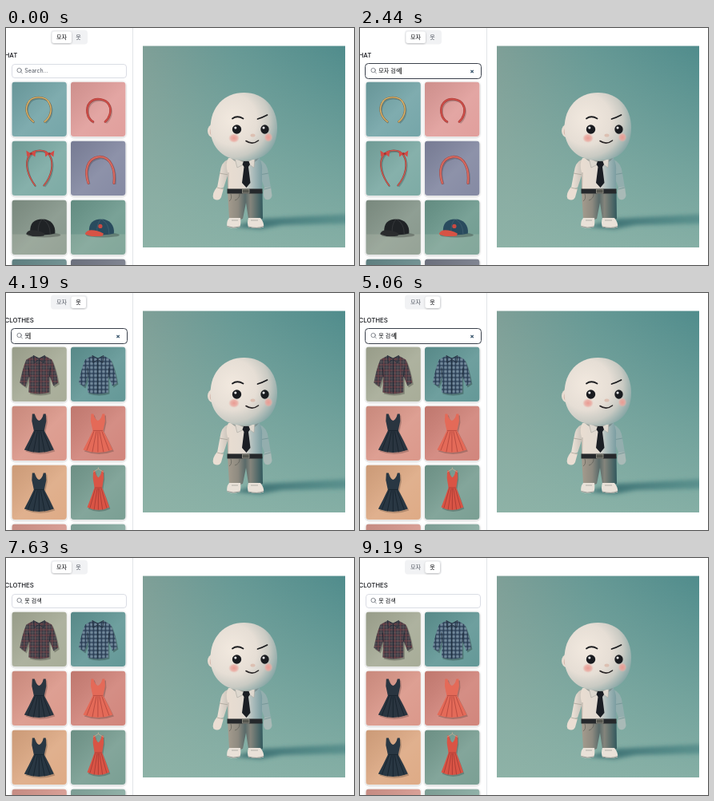
Recreate the animation shown at these times as an HTML page. Size 435 by 297 pixels, loop 9.25 s.

```html
<!DOCTYPE html>
<html>
<head>
<meta charset="utf-8">
<title>Outfit picker</title>
<style>
  html, body { margin: 0; width: 100%; height: 100%; overflow: hidden; background: #fff; }
  svg { display: block; width: 435px; height: 297px; }
  text { font-family: Inter, "Noto Sans CJK KR", "Noto Sans CJK", sans-serif; font-size: 7px; white-space: pre; }
  .tab { font-weight: 500; text-anchor: middle; }
  #heading { font-size: 7.8px; font-weight: 500; fill: #15171c; }
</style>
</head>
<body>
<svg viewBox="0 0 435 297">
  <defs>
    <linearGradient id="wall" x1="0" y1=".1" x2="1" y2="0">
      <stop offset="0" stop-color="#7f9f97"/><stop offset=".45" stop-color="#679995"/><stop offset="1" stop-color="#508c8c"/>
    </linearGradient>
    <linearGradient id="floor" x1="0" y1="0" x2="0" y2="1">
      <stop offset="0" stop-color="#91b7ab" stop-opacity="0"/><stop offset=".6" stop-color="#91b7ab" stop-opacity=".5"/><stop offset="1" stop-color="#91b7ab" stop-opacity=".8"/>
    </linearGradient>
    <linearGradient id="cast" x1="0" x2="1" y1="0" y2="0">
      <stop offset="0" stop-color="#2f6468" stop-opacity=".9"/><stop offset="1" stop-color="#3f7d7e" stop-opacity=".55"/>
    </linearGradient>
    <radialGradient id="skin" cx=".33" cy=".4" r=".74">
      <stop offset="0" stop-color="#f2e9df"/><stop offset=".5" stop-color="#e6ded5"/><stop offset=".74" stop-color="#c9cac3"/><stop offset="1" stop-color="#7fa2a2"/>
    </radialGradient>
    <radialGradient id="blush">
      <stop offset="0" stop-color="#e99a92"/><stop offset=".6" stop-color="#eaa79e" stop-opacity=".8"/><stop offset="1" stop-color="#eab5ab" stop-opacity="0"/>
    </radialGradient>
    <linearGradient id="cloth" x1="0" x2="1" y1="0" y2="0">
      <stop offset="0" stop-color="#e9ddd1"/><stop offset=".5" stop-color="#e2dad1"/><stop offset=".75" stop-color="#a9bbbb"/><stop offset="1" stop-color="#7a9da1"/>
    </linearGradient>
    <linearGradient id="sleeve" x1="0" x2="1" y1="0" y2="0">
      <stop offset="0" stop-color="#efe4d9"/><stop offset="1" stop-color="#c9c3ba"/>
    </linearGradient>
    <linearGradient id="pants" x1="0" x2="1" y1="0" y2="0">
      <stop offset="0" stop-color="#a59c8e"/><stop offset=".3" stop-color="#8e8a80"/><stop offset=".5" stop-color="#596a69"/><stop offset=".65" stop-color="#85857c"/><stop offset="1" stop-color="#31585d"/>
    </linearGradient>
    <linearGradient id="light" x1="0" y1="0" x2="1" y2="1">
      <stop offset="0" stop-color="#000" stop-opacity=".08"/><stop offset=".55" stop-color="#fff" stop-opacity=".1"/><stop offset="1" stop-color="#fff" stop-opacity=".03"/>
    </linearGradient>
    <pattern id="redPlaid" width="7" height="7" patternUnits="userSpaceOnUse">
      <path d="M0 0H7V7H0Z" fill="#34343f"/><path d="M0 1.5H7M1.5 0V7" stroke="#6d4449" stroke-width="1.3"/><path d="M0 5H7M5 0V7" stroke="#8f8583" stroke-width=".4"/>
    </pattern>
    <pattern id="bluePlaid" width="5" height="5" patternUnits="userSpaceOnUse">
      <path d="M0 0H5V5H0Z" fill="#466078"/><path d="M0 1H5M1 0V5" stroke="#93a8b4" stroke-width=".7"/><path d="M0 3.5H5M3.5 0V5" stroke="#2b3d52" stroke-width="1"/>
    </pattern>
    <filter id="soft" x="-30%" y="-60%" width="160%" height="220%"><feGaussianBlur stdDeviation="2.5"/></filter>
    <filter id="lift" x="-10%" y="-10%" width="120%" height="125%"><feDropShadow dx="0" dy=".7" stdDeviation=".8" flood-opacity=".28"/></filter>
    <clipPath id="photo"><path d="M171 22.5H424V275H171Z"/></clipPath>
    <clipPath id="card"><rect width="68.5" height="68.5" rx="4"/></clipPath>
  </defs>

  <path d="M0 0H435V297H0Z" fill="#fff"/>
  <path d="M158.5 0V297" stroke="#e1e4e8"/>

  <rect x="56" y="2.5" width="46" height="18" rx="4" fill="#f1f2f4"/>
  <rect id="pillHat" x="57.5" y="4.5" width="24.5" height="14.5" rx="3" fill="#fff" filter="url(#lift)"/>
  <rect id="pillClothes" x="81.5" y="4.5" width="18.5" height="14.5" rx="3" fill="#fff" filter="url(#lift)"/>
  <text id="labelHat" class="tab" x="69.5" y="14.3">모자</text>
  <text id="labelClothes" class="tab" x="90.5" y="14.3">옷</text>
  <text id="heading" x="-1.5" y="37.4"></text>

  <rect id="field" fill="#fff"/>
  <g fill="none" stroke="#555b65" stroke-width=".7" stroke-linecap="round">
    <circle cx="16.6" cy="53" r="2.7"/><path d="M18.6 55 20.4 56.8"/>
  </g>
  <text id="query" x="23.3" y="56.2"></text>
  <path id="caret" d="M0 49.5V58" stroke="#111" stroke-width="1"/>
  <path id="clear" d="M138.4 52.8 141.8 56.2M141.8 52.8 138.4 56.2" stroke="#27465f" stroke-width="1.1"/>
  <g id="hatCards"></g>
  <g id="clothesCards"></g>

  <g clip-path="url(#photo)">
    <path d="M171 22H424V275H171Z" fill="url(#wall)"/>
    <path d="M171 22H424V275H171Z" fill="url(#floor)"/>
    <path d="M285 249 322 239 430 233V245L345 247 318 252Z" fill="url(#cast)" filter="url(#soft)"/>

    <g id="legs">
      <path d="M277 205H320.5L321 239Q312 242 303 239L300 219 296 239Q288 242 279 239Z" fill="url(#pants)"/>
      <path d="M281 208Q283 214 279 217M292 208Q292 214 286 216" stroke="#5e5d57" stroke-width=".7" fill="none"/>
      <path d="M279 238H293Q294 246 292 249.500Q284 252 276.500 249Q275 243 279 238ZM303 238H318Q323 244 322 249.500Q314 252 303 249.500Q301 244 303 238Z" fill="#e9e1d8"/>
      <path d="M276.500 248.500Q284 251.500 292 249M303 249Q314 252 322 248.500" stroke="#8d938e" fill="none"/>
      <path d="M282 241H290M306 241H315" stroke="#aaa8a0" stroke-width=".9"/>
    </g>
    <g id="arms">
      <path d="M277 165Q269 168 267.500 181L264 200H272L278 182Z" fill="url(#sleeve)"/>
      <path d="M317 165Q326 168 328 182L331 200H323L316 181Z" fill="#93aeae"/>
      <path d="M264 199Q256.500 208 259.500 214Q266 218 269 212L272 201Z" fill="#eaded3"/>
      <path d="M323 200Q320 210 324 214.500Q331 217 332.500 210L331 199Z" fill="#a9bab7"/>
      <path d="M267 182 278 184M264 200 272 202" stroke="#a9a299" stroke-width=".8"/>
      <path d="M328 182 317 184M331 200 323 202" stroke="#6f9294" stroke-width=".8"/>
    </g>
    <path d="M278 163H317Q321 171 320 181V204H277V181Q274 170 278 163Z" fill="url(#cloth)"/>
    <path d="M278 181 277.500 203" stroke="#a39d95" stroke-width=".8"/>
    <path d="M281 163H316Q312 170 300 171Q288 170 281 163Z" fill="#6d7f7e" opacity=".6"/>
    <path d="M286 163 299 169 311 163 310 175 301 169 289 175Z" fill="#ded8cf" stroke="#a8a7a0" stroke-width=".6"/>
    <path d="M297 167H303.500L305 171 303 174 305.500 194 300.500 200 295 194 297.500 174 295.500 171Z" fill="#1b1e24"/>
    <path d="M276.500 201.500H320.500V207.500H276.500Z" fill="#25282b"/>
    <path d="M295.500 202H304V207H295.500Z" fill="#55564f" stroke="#98968c" stroke-width=".8"/>

    <ellipse cx="258.500" cy="129" rx="6.500" ry="8.200" fill="#e8dcd1"/>
    <ellipse cx="258" cy="130" rx="3.200" ry="4.800" fill="#d2b3a6"/>
    <path d="M297.500 81C322 81 339 99 339 125C339 151 324 166 298 166C273 166 255.500 151 255.500 125.500C255.500 99 273 81 297.500 81Z" fill="url(#skin)"/>
    <ellipse cx="285" cy="138" rx="7" ry="6" fill="url(#blush)"/>
    <ellipse cx="328" cy="137" rx="5.500" ry="6" fill="url(#blush)"/>
    <g fill="#191b1f">
      <circle cx="288.500" cy="127" r="5.700"/><ellipse cx="323.500" cy="127" rx="5.200" ry="5.700"/>
    </g>
    <path d="M283 113.500Q289 109 296.500 113.500M314.500 114Q320 112.500 326.500 109" fill="none" stroke="#1c1d20" stroke-width="1.800" stroke-linecap="round"/>
    <g fill="#fff"><circle cx="286.800" cy="125" r="1.500"/><circle cx="322" cy="125" r="1.500"/></g>
    <ellipse cx="308.500" cy="134.500" rx="3" ry="2" fill="#dcc0b2"/>
    <path d="M300 141.500Q308 147 315.500 141" fill="none" stroke="#292526" stroke-width="1.600" stroke-linecap="round"/>
  </g>
</svg>

<script>
const LOOP = 9250;
const FADE = 150;
const $ = id => document.getElementById(id);
const setAttrs = (el, attrs) => Object.entries(attrs).forEach(([k, v]) => el.setAttribute(k, v));

// Thumbnails, each drawn in a 68.5 px square.
const band = (d, color, edge, width) =>
  `<path d="${d}" transform="translate(1.2 1.5)" fill="none" stroke="#000" stroke-opacity=".18" stroke-width="${width}"/>
   <path d="${d}" fill="none" stroke="${edge}" stroke-width="${width}" stroke-linecap="round"/>
   <path d="${d}" fill="none" stroke="${color}" stroke-width="${width * .6}" stroke-linecap="round"/>`;

const bow = (x, y) =>
  `<path d="M${x} ${y}l-6-4 1 8zl6-4-1 8z" fill="#d34b45"/><circle cx="${x}" cy="${y}" r="1.5" fill="#a9302f"/>`;

const cap = (dome, brim, badge = '') =>
  `<path d="M0 43H69V69H0Z" fill="#dce0cf" opacity=".16"/>
   <ellipse cx="40" cy="44" rx="21" ry="3" fill="#000" opacity=".25"/>
   <path d="M23 41C22 29 28 24 38 24C49 24 55 32 54 42Q40 46 23 41Z" fill="${dome}"/>
   <path d="M38 24Q32 30 33 42M38 24Q48 29 48 43" fill="none" stroke="#fff" stroke-opacity=".13" stroke-width=".7"/>
   <path d="M23 38Q31 37 41 42L40 45Q27 47 18 43Q18 40 23 38Z" fill="${brim}"/>${badge}`;

const SHIRT = 'M27 11 18 16Q13 28 10 45L17 50 22 36 21 57Q34 61 47 57L47 36 52 49 58 45Q55 27 50 16L41 11 34 14Z';
const shirt = fill =>
  `<path d="${SHIRT}" transform="translate(1.5 2)" opacity=".25"/>
   <path d="${SHIRT}" fill="${fill}"/>
   <path d="M34 16V58M22 38 21 26M47 38 48 26" stroke="#15202c" stroke-width=".9" opacity=".8"/>
   <path d="M27 11 34 15 41 11 40 20 34 16 28 20Z" fill="${fill}" stroke="#202b38" stroke-width=".8"/>`;

const DRESS = 'M25.500 10H28.500Q30 17 34 18.500Q38 17 39.500 10H42.500L43 19 40.500 31Q47 43 52.500 55Q34 62 15.500 55Q22 43 27.500 31L25 19Z';
const dress = (color, fold) =>
  `<path d="${DRESS}" transform="translate(1.5 2)" opacity=".2"/>
   <path d="${DRESS}" fill="${color}"/>
   <path d="M28 31H40M29 32 20 56M32 32 27 58M34 32V58M36 32 41 58M39 32 48 56" fill="none" stroke="${fold}" stroke-width=".9"/>`;
const hungDress = (color, fold) =>
  `<g transform="translate(9 -3) scale(.75 1.02)">${dress(color, fold)}</g>
   <path d="M28 9 34.500 5 41 9M34.500 5V3" fill="none" stroke="#cdb498" stroke-width=".7"/>`;
const badge = '<circle cx="37" cy="33" r="2.6" fill="#c94a43"/>';

const hats = [
  ['#71a3a6', band('M27 50C19 44 16 35 20 27C24 17 43 17 47 27C51 35 48 45 41 50', '#d9b36c', '#80633b', 2.4)],
  ['#e09c99', band('M28 50C20 46 18 33 24 26C30 19 44 21 48 29C52 37 48 46 43 50', '#d34f49', '#9f3633', 2.6)],
  ['#79a8a2', band('M29 56C20 44 15 28 22 18C28 10 42 10 47 18C53 28 50 44 40 56', '#d7574d', '#6f4945', 2) + bow(24, 16) + bow(47, 16)],
  ['#8186a0', band('M22 53C17 38 20 22 35 20C50 19 56 36 54 53', '#d86b60', '#a54947', 3)],
  ['#839488', cap('#202326', '#2a2c2e')],
  ['#6b988c', cap('#294b5e', '#d75345', badge)],
  ['#66898a', ''],
  ['#747987', '']
];
const clothes = [
  ['#a5aa95', shirt('url(#redPlaid)')],
  ['#5f9594', shirt('url(#bluePlaid)')],
  ['#da9587', dress('#2a3540', '#18222c')],
  ['#d08278', dress('#e46a58', '#b5493f')],
  ['#dda882', dress('#293743', '#17232d')],
  ['#769c90', hungDress('#d95445', '#a53a33')],
  ['#d6978d', ''],
  ['#86aaa0', '']
];

const renderCards = cards => cards.map(([color, art], i) =>
  `<g transform="translate(${7.3 + i % 2 * 73.6} ${67.4 + Math.floor(i / 2) * 74})">
    <rect x="-.5" y="-.5" width="69.500" height="69.500" rx="4.500" fill="#f4f5f5" filter="url(#lift)"/>
    <g clip-path="url(#card)"><path d="M0 0H69V69H0Z" fill="${color}"/><path d="M0 0H69V69H0Z" fill="url(#light)"/>${art}</g>
  </g>`).join('');
$('hatCards').innerHTML = renderCards(hats);
$('clothesCards').innerHTML = renderCards(clothes);

// Steps: [start, tab, query, focused, clear button]
const typing = (start, gap, tab, words) =>
  words.map((word, i) => [start + i * gap, tab, word, true, true]);
const hatWords = ['ㅁ', '모', '몾', '모자', '모자 ', '모자 ㄱ', '모자 거', '모자 검', '모자 검ㅅ', '모자 검새', '모자 검색'];
const clothesWords = ['ㅇ', '오', '옷', '옷 ', '옷 ㄱ', '옷 거', '옷 검', '옷 검ㅅ', '옷 검새', '옷 검색'];
const steps = [
  [0, 'hat', '', false, false],
  [620, 'hat', '', true, false],
  ...typing(1000, 125, 'hat', hatWords),
  [3060, 'clothes', '', false, false],
  [3700, 'clothes', '', true, false],
  ...typing(3900, 125, 'clothes', clothesWords),
  [5750, 'hat', '모자 검색', false, false],
  [6060, 'hat', '모자 검색', false, true],
  [6900, 'hat', '모자 검색', false, false],
  [7620, 'clothes', '옷 검색', false, false]
];
const switches = [3060, 5750, 7620];

const clothesShare = t => {
  const index = switches.findLastIndex(at => at <= t);
  if (index < 0) return 0;
  const p = Math.min(1, (t - switches[index]) / FADE);
  const eased = p * p * (3 - 2 * p);
  return index % 2 ? 1 - eased : eased;
};
const labelColor = share => {
  const mix = (a, b) => Math.round(a + (b - a) * share);
  return `rgb(${mix(84, 5)},${mix(89, 6)},${mix(100, 10)})`;
};

function render(t) {
  const [start, tab, query, focused, clear] = steps.findLast(step => step[0] <= t);
  const isHat = tab === 'hat';
  const share = clothesShare(t);
  $('pillHat').style.opacity = 1 - share;
  $('pillClothes').style.opacity = share;
  $('labelHat').style.fill = labelColor(1 - share);
  $('labelClothes').style.fill = labelColor(share);
  $('heading').textContent = isHat ? 'HAT' : 'CLOTHES';
  $('hatCards').style.display = isHat ? '' : 'none';
  $('clothesCards').style.display = isHat ? 'none' : '';

  setAttrs($('field'), focused
    ? { x: 6.5, y: 44.5, width: 145, height: 19, rx: 4, stroke: '#3a404b', 'stroke-width': 1 }
    : { x: 7.5, y: 45.5, width: 143, height: 17, rx: 3.5, stroke: '#d6dae1', 'stroke-width': .9 });
  const text = $('query');
  text.textContent = query || 'Search...';
  text.style.fill = query ? '#0b0d11' : '#4f555f';
  const caretX = 23.5 + (query ? text.getComputedTextLength() : 0);
  $('caret').setAttribute('transform', `translate(${caretX} 0)`);
  $('caret').style.display = focused && (t - start) % 1000 < 500 ? '' : 'none';
  $('clear').style.display = clear ? '' : 'none';
}

const origin = performance.now();
function tick() {
  render((performance.now() - origin) % LOOP);
  requestAnimationFrame(tick);
}
tick();
</script>
</body>
</html>
```
